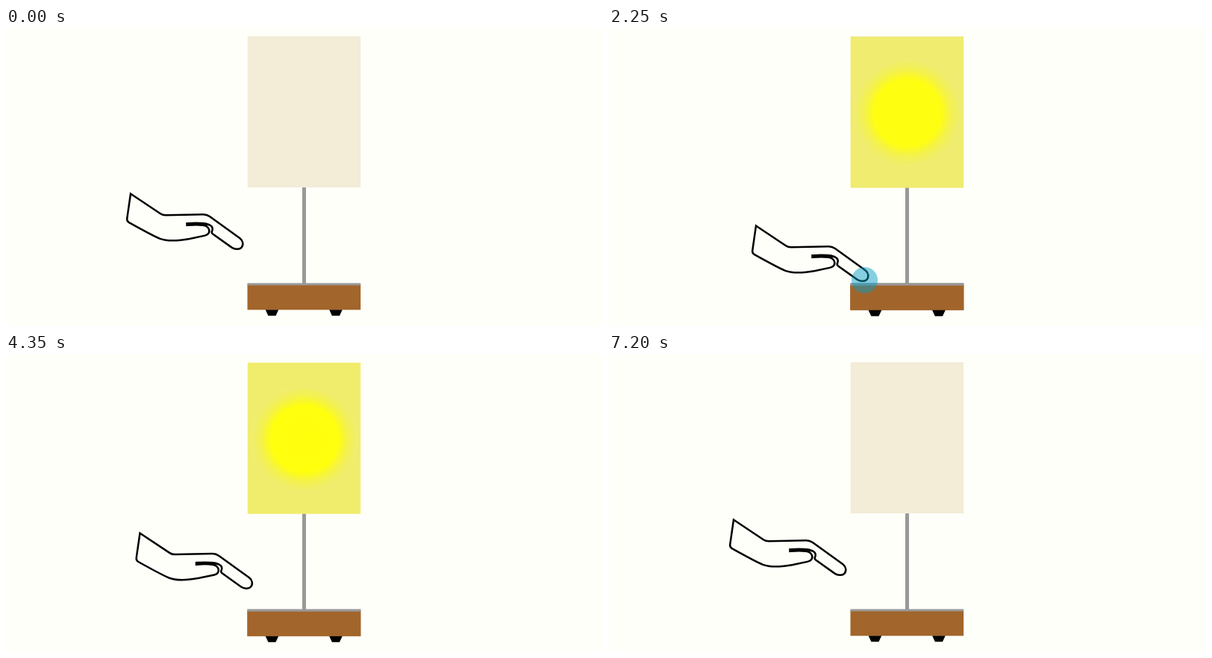
Animation of 800 by 400 pixels, one loop 7.23 s. Source, as an HTML page with a canvas:

```html
<!DOCTYPE html>
<html lang="en">
<head>
<meta charset="utf-8">
<title>Touch lamp</title>
<style>
html, body { margin: 0; width: 100%; height: 100%; overflow: hidden; background: #fffffa; }
canvas { display: block; }
</style>
</head>
<body>
<canvas id="stage" width="800" height="400"></canvas>
<script>
const ctx = document.getElementById('stage').getContext('2d');

const LOOP = 7230, STEP = 30;
// One cycle: approach, touch, return
const CYCLE = 3600, TOUCH = 1800, RELEASE = 2268, GLOW_END = 2700;
const REACH = { x: 30, y: 43 };

const outline = new Path2D(
  'M167 222.5 L207 249.2 Q209.8 251.2 214 251.2 L264 250.2 ' +
  'Q269 250.1 273 253 L313.5 282.3 C317.6 285.5 318.6 291 315.6 294.6 ' +
  'C312.5 298 306.5 297 302.5 294.6 L276.8 276.2 Q274.8 274.6 276.4 271.8 ' +
  'C278 267 274 264 268.5 262.8 Q260 261.3 242.5 262.2 L242.5 264.8 ' +
  'Q256 263.6 264 264.8 C272 266 273.5 272 271.6 275.3 Q270.4 277.7 266.5 278.6 ' +
  'L246 282.9 Q220 287.7 206.5 282.8 Q198 279.5 164.5 260.8 ' +
  'Q161.8 259 162.2 255.8 Z'
);
const thumbGap = new Path2D('M242 262 Q260 261.3 268.5 263 L272 265.5 Q262 263.2 242 265 Z');

const glow = ctx.createRadialGradient(400, 114, 0, 400, 114, 72);
glow.addColorStop(0, '#ffff0c');
glow.addColorStop(0.62, '#ffff0e');
glow.addColorStop(0.7, '#faf828');
glow.addColorStop(0.8, '#f4f24c');
glow.addColorStop(0.92, '#f1ee65');
glow.addColorStop(1, '#f0ed6d');

const clamp = v => Math.max(0, Math.min(1, v));
const ramp = (t, a, b) => clamp((t - a) / (b - a));

function box(color, x, y, w, h) {
  ctx.fillStyle = color;
  ctx.fillRect(x, y, w, h);
}

function disc(color, x, y, r) {
  ctx.fillStyle = color;
  ctx.beginPath();
  ctx.arc(x, y, r, 0, Math.PI * 2);
  ctx.fill();
}

function foot(x, y) {
  ctx.fillStyle = '#000';
  ctx.beginPath();
  ctx.moveTo(x, y);
  ctx.lineTo(x + 17.5, y);
  ctx.lineTo(x + 13.8, y + 8);
  ctx.lineTo(x + 3.7, y + 8);
  ctx.fill();
}

function lamp(lit) {
  const d = lit ? 0.6 : 0;
  box('#999', 397, 213, 5, 131);
  box(lit ? '#f0ed6d' : '#f3ecd7', 323.7, 11 + d, 151.5, 203);
  if (lit) {
    disc(glow, 400, 114, 71.5);
    ctx.strokeStyle = '#f3ef77';
    ctx.lineWidth = 1;
    ctx.beginPath();
    ctx.arc(400, 114, 71, 0, Math.PI * 2);
    ctx.stroke();
  }
  box('#a2652b', 323.5 - d / 2, 344 + d, 151.7 + d, 34.3);
  box('#999', 323.5 - d / 2, 342.4, 151.7 + d, 3 + d / 2);
  foot(347.7, 378.2 + d);
  foot(433.2, 378.2 + d);
}

function hand(k) {
  ctx.save();
  ctx.translate(REACH.x * k, REACH.y * k);
  ctx.strokeStyle = ctx.fillStyle = '#000';
  ctx.lineWidth = 2.5;
  ctx.stroke(outline);
  ctx.fill(thumbGap);
  ctx.restore();
}

function draw(time) {
  const t = Math.floor((time % LOOP) / STEP) * STEP;
  const c = t % CYCLE;
  const press = ramp(c, TOUCH, RELEASE);
  const light = t < CYCLE ? press : t < 2 * CYCLE ? 1 - press : 0;
  const reach = c < TOUCH ? c / TOUCH : 1 - ramp(c, RELEASE, CYCLE);
  const pulse = press * (1 - ramp(c, RELEASE, GLOW_END));

  box('#fffffa', 0, 0, 800, 400);
  if (light < 1) lamp(false);
  if (light > 0) {
    ctx.globalAlpha = light;
    lamp(true);
    ctx.globalAlpha = 1;
  }
  hand(reach);
  if (pulse > 0) {
    ctx.globalAlpha = pulse * 0.5;
    disc('#069cc6', 342.5, 338.5, 17.6);
    ctx.globalAlpha = 1;
  }
}

const start = performance.now();
function tick() {
  draw(performance.now() - start);
  requestAnimationFrame(tick);
}
tick();
</script>
</body>
</html>
```
